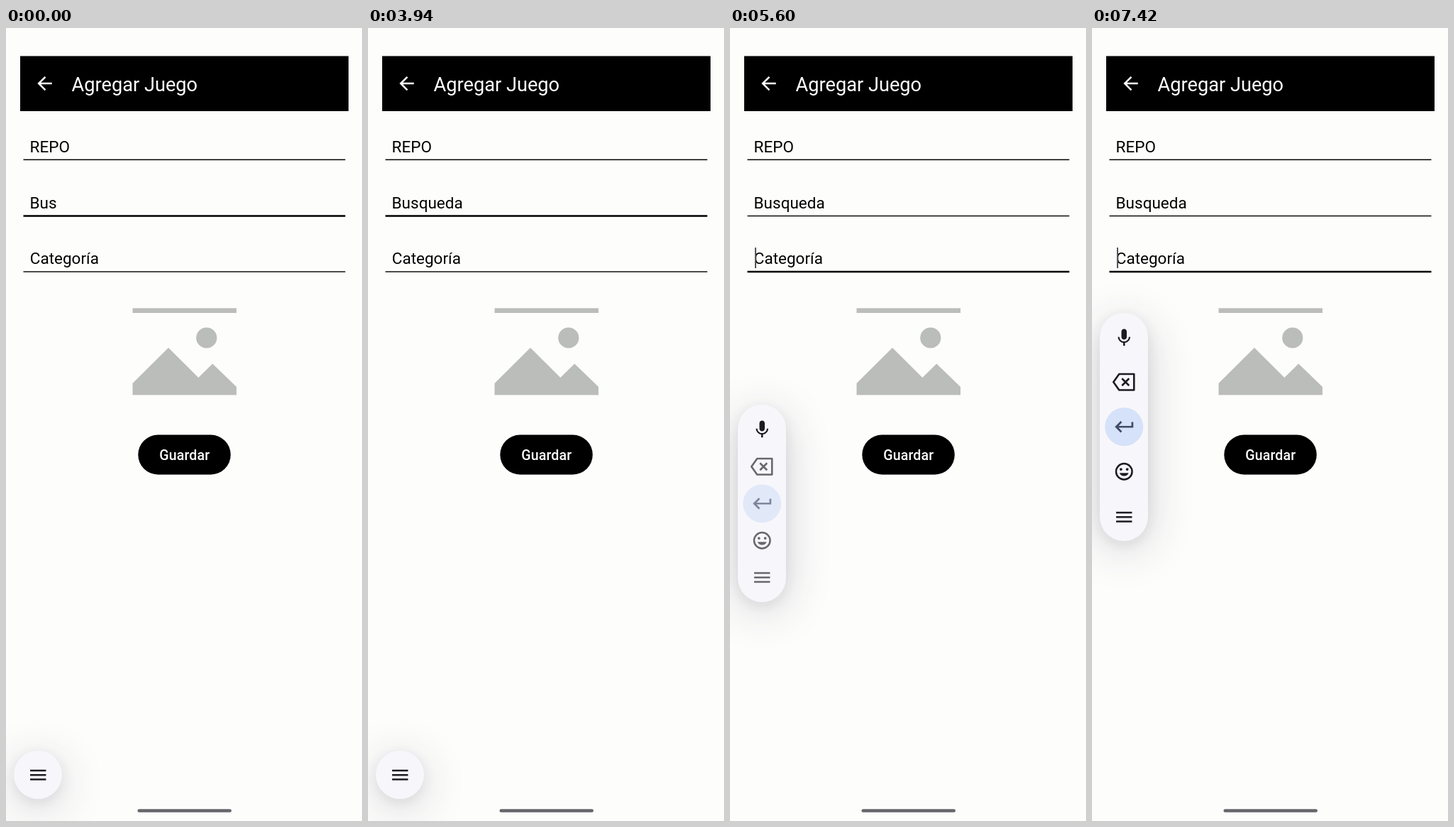
Recreate the animation shown at these times as an HTML page. Size 502 by 1116 pixels, loop 8000 ms.

```html
<!DOCTYPE html>
<html lang="es">
<head>
<meta charset="utf-8">
<style>
html, body { margin: 0; width: 100%; height: 100%; overflow: hidden; background: #fdfdfc; }
#scene { position: absolute; left: 0; top: 0; font: 22.5px Roboto, sans-serif; }
#pill {
  position: absolute; left: 10.5px; width: 68.5px; border-radius: 34.25px; background: #f7f7fb;
  box-shadow: 0 12px 64px rgba(40, 40, 60, .2), 0 5px 18px rgba(40, 40, 60, .09);
}
#pill svg { position: absolute; left: 0; width: 68.5px; height: 68.5px; fill: #1b1b21; }
</style>
</head>
<body>
<svg id="scene" width="502" height="1116">
  <rect x="20" y="39.5" width="463" height="77.5"/>
  <path transform="translate(39.3 62.8) scale(1.27)" fill="#fff"
    d="M20 11H7.83l5.59-5.59L12 4l-8 8 8 8 1.41-1.41L7.83 13H20z"/>
  <text x="92.5" y="89" font-size="27.2" fill="#fff">Agregar Juego</text>
  <text x="33.6" y="175.3">REPO</text>
  <text id="typed" x="33.6" y="254"></text>
  <text x="33.8" y="332.4">Categoría</text>
  <rect x="24.5" y="184.6" width="454" height="1.5"/>
  <rect id="line2" x="24.5" width="454"/>
  <rect id="line3" x="24.5" width="454"/>
  <rect id="caret" width="2" height="29" fill="#55555a"/>
  <g fill="#bbbdbb">
    <rect x="178.5" y="394.3" width="146.5" height="6.7"/>
    <circle cx="282.8" cy="436" r="14.6"/>
    <path d="M178.5 516.5V500L229 450l42.300 42 20-19.500L325 505v11.500z"/>
  </g>
  <rect x="186.300" y="572.500" width="130.500" height="56" rx="28"/>
  <text x="251.700" y="608.200" font-size="19.600" font-weight="500" letter-spacing=".14" text-anchor="middle" fill="#fff">Guardar</text>
  <rect x="185.500" y="1099.300" width="132.500" height="4.500" rx="2.200" fill="#66666b"/>
</svg>
<div id="pill">
  <svg viewBox="-34.25 -34.25 68.5 68.5"><path transform="scale(1.25) translate(-12 -11.5)"
    d="M12 14c1.66 0 3-1.34 3-3V5c0-1.660-1.340-3-3-3S9 3.340 9 5v6c0 1.660 1.340 3 3 3zM17.300 11c0 3-2.540 5.100-5.300 5.100S6.700 14 6.700 11H5c0 3.410 2.720 6.230 6 6.720V21h2v-3.280c3.280-.480 6-3.300 6-6.720z"/></svg>
  <svg viewBox="-34.25 -34.25 68.5 68.5"><path fill="none" stroke="#1b1b21" stroke-width="2.6" stroke-linejoin="round"
    d="M-7 -11.300H14V11.300H-7L-15 0ZM-3 -5L7 5M7 -5L-3 5"/></svg>
  <svg viewBox="-34.25 -34.25 68.5 68.5"><circle r="27" fill="#d6e2f9"/><path transform="scale(1.37) translate(-11.5 -12)" fill="#3f4c68"
    d="M19 7v4H5.830l3.580-3.590L8 6l-6 6 6 6 1.410-1.410L5.830 13H21V7z"/></svg>
  <svg viewBox="-34.25 -34.25 68.5 68.5"><circle r="11.3" fill="none" stroke="#1b1b21" stroke-width="2.5"/>
    <circle cx="-4.4" cy="-3.2" r="1.9"/><circle cx="4.4" cy="-3.2" r="1.9"/>
    <path d="M-6.400 2H6.400A6.900 6.900 0 0 1-6.400 2z"/></svg>
  <svg viewBox="-34.25 -34.25 68.5 68.5"><path d="M-11.200 -7.500h22.400v2.400h-22.400zM-11.200 -1.200h22.400v2.400h-22.400zM-11.200 5.100h22.400v2.400h-22.400z"/></svg>
</div>
<script>
const LOOP = 8000, END = 68.5;
const $ = id => document.getElementById(id);
const icons = [...$('pill').children];

const keystrokes = [300, 860, 1540, 2100, 2540];
const stalls = [[5200, 5300], [5760, 5880], [6020, 6460]];
const bottom = [[5000, 1085], [5100, 1075], [5200, 1045], [5300, 997], [5400, 932], [5500, 868],
  [5600, 808], [5760, 744], [5880, 739], [6020, 733], [6460, 722]];
const height = [[5200, END], [5300, 112], [5400, 185], [5500, 240], [5600, 277],
  [5760, 307], [5880, 311], [6020, 315], [6460, 321]];
const fadeIn = [[5250, 0], [5600, .65], [5760, .9], [6020, 1]];
const micFade = [[5250, 0], [5550, 1]];
const menuFade = [[5020, 1], [5200, .75], [5400, .55], [5600, .65], [5760, .9], [6020, 1]];

function track(points, t) {
  const i = points.findIndex(p => p[0] > t);
  if (i === 0) return points[0][1];
  if (i < 0) return points[points.length - 1][1];
  const [t0, a] = points[i - 1], [t1, b] = points[i];
  return a + (b - a) * (t - t0) / (t1 - t0);
}

function setLine(id, middle, focused) {
  const thickness = focused ? 2.5 : 1.4;
  $(id).setAttribute('y', middle - thickness / 2);
  $(id).setAttribute('height', thickness);
}

function drawForm(t) {
  const typed = $('typed'), caret = $('caret');
  typed.textContent = 'Busqueda'.slice(0, 3 + keystrokes.filter(k => t >= k).length);
  setLine('line2', 264.5, t < 4620);
  setLine('line3', 343, t >= 4360);
  const inSecond = t >= 300 && t < 3940;
  const inThird = t >= 4640 && !(t >= 6460 && t < 7420);
  caret.setAttribute('visibility', inSecond || inThird ? 'visible' : 'hidden');
  caret.setAttribute('x', inSecond ? 33.1 + typed.getComputedTextLength() - .6 : 35);
  caret.setAttribute('y', inSecond ? 230.3 : 309);
}

function drawPill(t) {
  const stall = stalls.find(([from, to]) => t >= from && t < to);
  if (stall) t = stall[0];
  const h = track(height, t);
  $('pill').style.top = track(bottom, t) - h + 'px';
  $('pill').style.height = h + 'px';
  icons.forEach((icon, i) => {
    icon.style.top = (h - END) * i / 4 + 'px';
    icon.style.opacity = track(i === 4 ? menuFade : i ? fadeIn : micFade, t);
  });
}

function frame() {
  const t = performance.now() % LOOP;
  drawForm(t);
  drawPill(t);
  requestAnimationFrame(frame);
}
frame();
</script>
</body>
</html>
```
